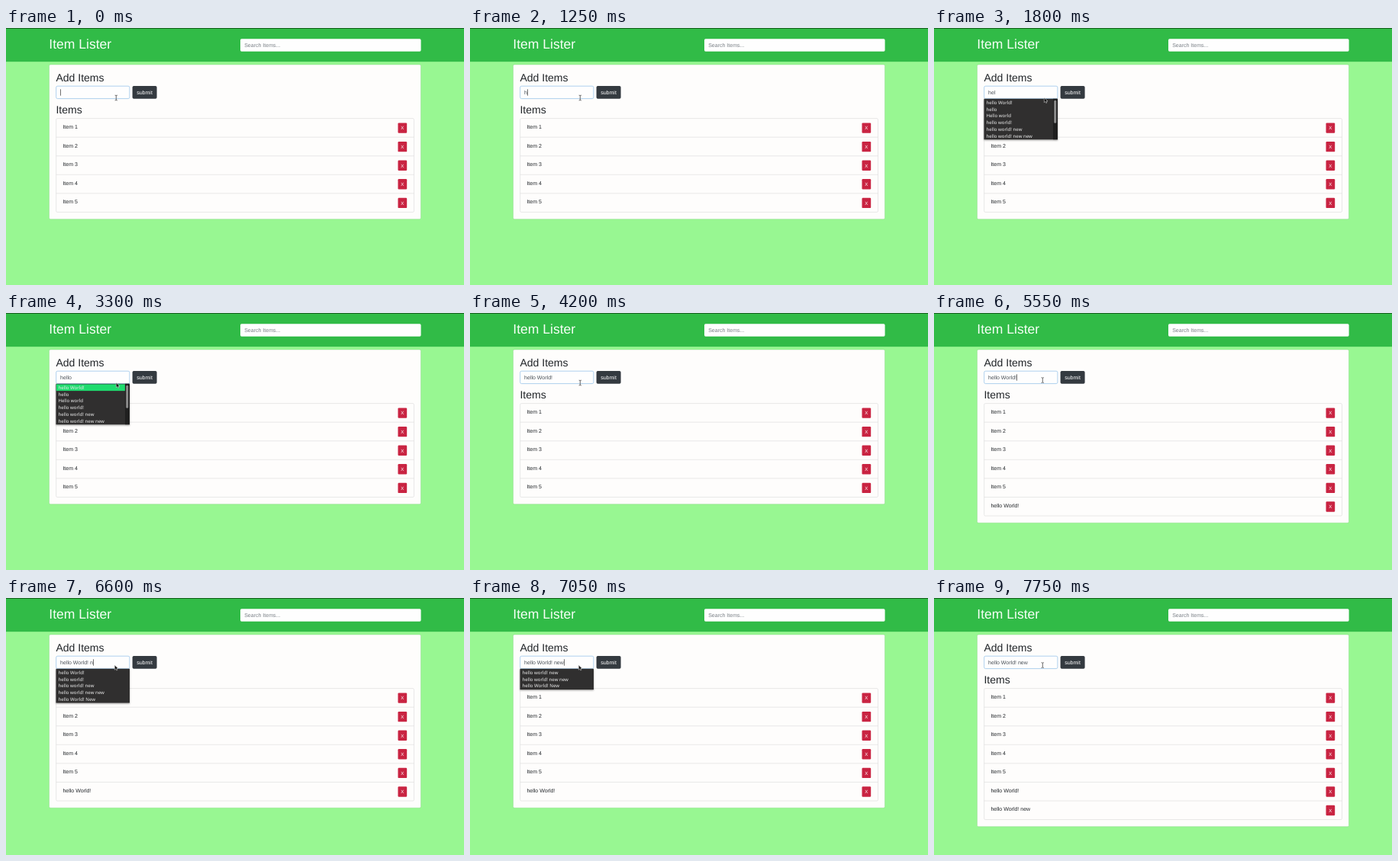
An HTML page that plays this animation: 600x337 px, repeating every 8000 ms.

```html
<!DOCTYPE html>
<html lang="en">
<head>
<meta charset="utf-8">
<title>Item Lister</title>
<style>
  html, body { margin: 0; width: 100%; height: 100%; overflow: hidden; background: #98f792; }
  svg { display: block; width: 600px; height: 337px; font: 7.02px "Liberation Sans", Arial, sans-serif; }
  text { white-space: pre; fill: #212529; text-rendering: geometricPrecision; }
  .title { font-size: 17.55px; fill: #f6fff6; }
  .head { font-size: 14.04px; }
  .hint { fill: #7a8086; }
  .light { fill: #fff; }
  .entry { fill: #495057; }
  .del { font-size: 6.14px; fill: #fff; text-anchor: middle; }
  .field { fill: #fefefe; stroke: #8fbfe8; stroke-width: .7; }
  .rule { fill: none; stroke: #dadada; stroke-width: .6; }
  .menu { filter: drop-shadow(0 1px 1.2px rgba(0, 0, 0, .4)); }
  .menu text { font: 6.1px "Noto Sans", "Open Sans", sans-serif; fill: #ececec; }
</style>
</head>
<body>
<svg viewBox="0 0 600 337">
  <rect width="600" height="337" fill="#98f792"/>
  <rect width="600" height="44.2" fill="#31bb47"/>
  <rect width="600" height="1" fill="#17601f"/>
  <text class="title" x="56.3" y="27">Item Lister</text>
  <rect x="307" y="14.3" width="236.6" height="16.4" rx="1.6" fill="#fefefe"/>
  <text class="hint" x="312.2" y="25">Search Items...</text>

  <rect id="card" x="56.5" y="48" width="487" rx="1.6" fill="#fefdfc" stroke="#7dcf79" stroke-width=".4"/>
  <text class="head" x="65.4" y="70">Add Items</text>
  <rect class="field" x="65.7" y="76.2" width="96.2" height="16.4" rx="1.8"/>
  <text class="entry" id="entry" x="71.1" y="87"></text>
  <rect id="caret" y="80.3" width=".7" height="8.4" fill="#333"/>
  <rect x="165.6" y="76" width="32" height="16.7" rx="1.8" fill="#343a40"/>
  <text class="light" x="171.2" y="87">submit</text>
  <text class="head" x="65.4" y="112.2">Items</text>
  <g id="list"></g>
  <rect class="rule" id="frame" x="65.7" y="118.6" width="468.8" rx="1.6"/>

  <g class="menu" id="menu"></g>
  <g id="mouse">
    <path id="beam" d="M-1.6-3.3Q0-3.3 0-2.6Q0-3.3 1.6-3.3M0-2.6V2.8M-1.6 3.4Q0 3.4 0 2.8Q0 3.4 1.6 3.4" fill="none" stroke="#444" stroke-width=".8"/>
    <path id="arrow" d="M0 0V6.2L1.5 4.9L2.5 7L3.6 6.5L2.7 4.5H4.7Z" fill="#111" stroke="#e8e8e8" stroke-width=".5"/>
  </g>
</svg>
<script>
const LOOP = 8000, ROW = 24.57, LIST_TOP = 118.6, MENU_TOP = 93.4, MENU_ROW = 8.7;
const $ = id => document.getElementById(id);
const rect = (x, y, w, h, fill, rx = 0) =>
  `<rect x="${x}" y="${y}" width="${w}" height="${h}" rx="${rx}" fill="${fill}"/>`;

const items = ['Item 1', 'Item 2', 'Item 3', 'Item 4', 'Item 5', 'hello World!', 'hello World! new'];
const menus = {
  all: ['hello World!', 'hello', 'Hello world', 'hello world!', 'hello world! new', 'hello world! new new'],
  world: ['hello World!', 'hello world!', 'hello world! new', 'hello world! new new', 'hello World! New'],
  next: ['hello world! new', 'hello world! new new', 'hello World! New']
};

// Each step changes part of the state from its time on.
const steps = [
  [0, { text: '', caret: true, menu: '', picked: false, count: 5 }],
  [600, { caret: false }],
  [1250, { text: 'h', caret: true }],
  [1300, { menu: 'all' }],
  [1550, { text: 'he' }],
  [1800, { text: 'hel', caret: false }],
  [1900, { caret: true }],
  [2100, { text: 'hell' }],
  [2250, { text: 'hello' }],
  [3000, { caret: false }],
  [3250, { picked: true }],
  [3650, { text: 'hello World!', caret: true, menu: '', picked: false }],
  [4200, { caret: false }],
  [4400, { count: 6 }],
  [4800, { caret: true }],
  [5400, { caret: false }],
  [5550, { caret: true }],
  [5850, { text: 'hello World! ' }],
  [5900, { menu: 'world' }],
  [6600, { text: 'hello World! n' }],
  [6650, { menu: 'next' }],
  [6800, { text: 'hello World! ne' }],
  [7000, { text: 'hello World! new' }],
  [7250, { menu: '', count: 7 }],
  [7750, { caret: false }]
];

function drawList(count) {
  const bottom = LIST_TOP + count * ROW;
  $('list').innerHTML = items.slice(0, count).map((name, i) => {
    const y = LIST_TOP + i * ROW;
    const line = i ? `<path class="rule" d="M65.7 ${y}H534.5"/>` : '';
    return line + `<text x="74.4" y="${y + 13.4}">${name}</text>` +
      rect(513.5, y + 5.8, 11.7, 13.4, '#c92442', 1.2) +
      `<text class="del" x="519.3" y="${y + 14.8}">X</text>`;
  }).join('');
  $('frame').setAttribute('height', count * ROW);
  $('card').setAttribute('height', bottom + 9.2 - 48);
}

function drawMenu(name, picked) {
  const rows = menus[name] || [];
  const height = rows.length * MENU_ROW + 1.2;
  let out = rows.length ? rect(65.5, 92.8, 96.5, height, '#302f2f') : '';
  if (name === 'all') {
    out += rect(156, 92.8, 6, height, '#1f1f1f') + rect(157.2, 94.8, 3, 30, '#8b8b8b', 1.5);
  }
  if (picked) out += rect(65.9, MENU_TOP, 90, MENU_ROW, '#1edb6e');
  out += rows.map((row, i) => `<text x="68.4" y="${MENU_TOP + i * MENU_ROW + 6.6}">${row}</text>`).join('');
  $('menu').innerHTML = out;
}

let shown = -1;
function draw() {
  const t = performance.now() % LOOP;
  const at = steps.filter(([start]) => start <= t).length;
  if (at !== shown) {
    shown = at;
    const s = Object.assign({}, ...steps.slice(0, at).map(step => step[1]));
    $('entry').textContent = s.text;
    $('caret').setAttribute('x', 71.3 + (s.text ? $('entry').getComputedTextLength() : 0));
    $('caret').style.display = s.caret ? '' : 'none';
    drawList(s.count);
    drawMenu(s.menu, s.picked);
    $('beam').style.display = s.menu ? 'none' : '';
    $('arrow').style.display = s.menu ? '' : 'none';
  }
  const move = Math.min(1, Math.max(0, (t - 4550) / 250));
  $('mouse').setAttribute('transform', `translate(${144.3 - 2 * move} ${91.5 - 3.5 * move})`);
  requestAnimationFrame(draw);
}
draw();
</script>
</body>
</html>
```
